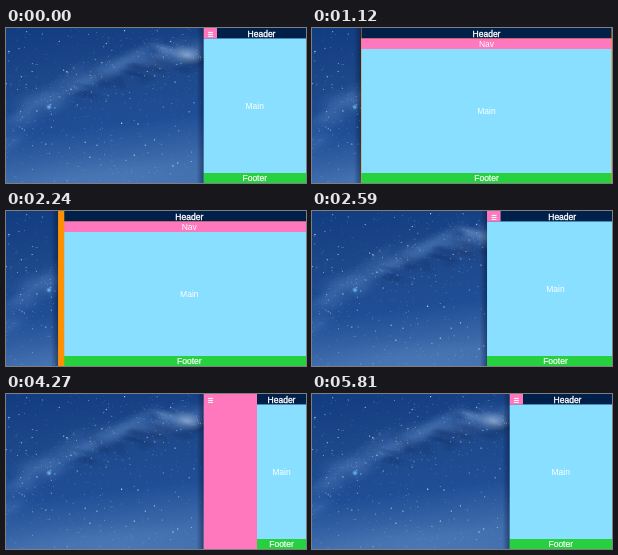
Recreate the animation shown at these times as an HTML page with a canvas. Size 300x155 px, loop 5.88 s.

```html
<!DOCTYPE html>
<html lang="en">
<head>
<meta charset="utf-8">
<title>Responsive grid layout</title>
<style>
html, body { margin: 0; width: 100%; height: 100%; overflow: hidden; background: #1c4788; }
canvas { display: block; width: 300px; height: 155px; }
</style>
</head>
<body>
<canvas id="stage"></canvas>
<script>
const W = 300, H = 155, LOOP = 5880, STEP = 70;
const NARROW = 197.5, WIDE = -6, MAX = 250, BREAK = 165, LAG = 43;
const HEAD = 10.5, FOOT = 145, BUTTON = 13.5, DRAWER = 53.5;
const OPEN = 3990, CLOSE = 5250;
const COLOR = { navy: '#00204a', pink: '#ff78bd', aqua: '#88dfff', green: '#27d03f', orange: '#ff9100' };

const canvas = document.getElementById('stage');
const ctx = canvas.getContext('2d');
const dpr = window.devicePixelRatio || 1;
canvas.width = W * dpr;
canvas.height = H * dpr;

let seed = 41;
function rand() {
  seed = (seed * 16807) % 2147483647;
  return seed / 2147483647;
}
const spread = () => rand() + rand() + rand() - 1.5;

function glow(c, x, y, rx, ry, rgb, alpha, turn = -0.5) {
  c.save();
  c.translate(x, y);
  c.rotate(turn);
  c.scale(rx, ry);
  const g = c.createRadialGradient(0, 0, 0, 0, 0, 1);
  g.addColorStop(0, `rgba(${rgb},${alpha})`);
  g.addColorStop(0.5, `rgba(${rgb},${alpha * 0.5})`);
  g.addColorStop(1, `rgba(${rgb},0)`);
  c.fillStyle = g;
  c.fillRect(-1, -1, 2, 2);
  c.restore();
}

// height of the galaxy band over x
const bandY = x => 112 - 112 * Math.pow(x / 200, 0.62) + 22 * Math.pow(x / 200, 3);

function paintSky() {
  const sky = document.createElement('canvas');
  sky.width = W * dpr;
  sky.height = H * dpr;
  const c = sky.getContext('2d');
  c.scale(dpr, dpr);
  const g = c.createLinearGradient(0, 0, 20, H);
  g.addColorStop(0, '#123c80');
  g.addColorStop(0.35, '#1c4789');
  g.addColorStop(0.7, '#204e96');
  g.addColorStop(1, '#416ead');
  c.fillStyle = g;
  c.fillRect(0, 0, W, H);
  glow(c, 110, 155, 110, 28, '90,135,195', 0.35, 0);

  for (let i = 0; i < 42; i++) {
    const x = i * 4.8;
    glow(c, x, bandY(x) + spread() * 12, 16 + rand() * 12, 7 + rand() * 6, '105,148,208', 0.16);
  }
  for (let i = 0; i < 30; i++) {
    const x = 75 + rand() * 122;
    glow(c, x, bandY(x) + 13 + spread() * 9, 9 + rand() * 8, 3 + rand() * 3, '18,42,92', 0.24, 0.2);
  }
  glow(c, 181, 27, 18, 10, '185,210,238', 0.55, 0.2);
  glow(c, 158, 21, 15, 6, '150,185,225', 0.4, 0.3);

  for (let i = 0; i < 950; i++) {
    const inBand = i % 3 === 0;
    const x = rand() * 200;
    const y = inBand ? bandY(x) + spread() * 34 : rand() * H;
    const size = 0.45 + Math.pow(rand(), 4) * 0.8;
    c.fillStyle = `rgba(205,226,250,${0.15 + Math.pow(rand(), 2) * 0.65})`;
    c.fillRect(x, y, size, size);
  }
  for (let i = 0; i < 38; i++) {
    c.fillStyle = `rgba(225,240,255,${0.55 + rand() * 0.4})`;
    c.beginPath();
    c.arc(rand() * 197, rand() * 140, 0.45 + rand() * 0.3, 0, 7);
    c.fill();
  }
  glow(c, 43, 79, 3, 3, '120,205,255', 0.9, 0);
  return sky;
}

function ease(t, start, end) {
  const u = Math.min(1, Math.max(0, (t - start) / (end - start)));
  return u * u * (3 - 2 * u);
}

// left edge of the dragged window
function edge(t) {
  return NARROW
    + (49 - NARROW) * ease(t, 490, 1120)
    + (WIDE - 49) * ease(t, 1120, 1680)
    + (NARROW - WIDE) * ease(t, 1960, 2754);
}

function box(x, y, right, bottom, color) {
  ctx.fillStyle = color;
  ctx.fillRect(x, y, right - x, bottom - y);
}

function label(text, x, y, weight = 0) {
  ctx.fillStyle = ctx.strokeStyle = '#fff';
  ctx.fillText(text, x, y);
  if (weight) {
    ctx.lineWidth = weight;
    ctx.strokeText(text, x, y);
  }
}

function menuIcon(x) {
  ctx.fillStyle = '#fff';
  for (let i = 0; i < 3; i++) ctx.fillRect(x - 2.4, 3.9 + i * 2, 4.8, 1);
}

function stackLayout(left, width) {
  const a = left + Math.max(0, (width - MAX) / 2);
  const b = a + Math.min(MAX, width);
  const mid = (a + b) / 2;
  box(left, 0, W, H, COLOR.orange);
  box(a, 0, b, HEAD, COLOR.navy);
  box(a, HEAD, b, 21, COLOR.pink);
  box(a, 21, b, FOOT, COLOR.aqua);
  box(a, FOOT, b, H, COLOR.green);
  label('Header', mid, 8.7, 0.35);
  label('Nav', mid, 19.2);
  label('Main', mid, 86.2);
  label('Footer', mid, 153.3, 0.2);
}

function compactLayout(left, width, open) {
  const right = left + width;
  const start = left + (open ? DRAWER : BUTTON);
  const body = open ? start : left;
  const mid = (body + right) / 2;
  box(start, 0, right, HEAD, COLOR.navy);
  box(body, HEAD, right, FOOT, COLOR.aqua);
  box(body, FOOT, right, H, COLOR.green);
  box(left, 0, start, open ? H : HEAD, COLOR.pink);
  menuIcon(left + 7);
  label('Header', (start + right) / 2, 8.7, 0.35);
  label('Main', mid, 81.2);
  label('Footer', mid, 153.3, 0.2);
}

const sky = paintSky();

function draw(t) {
  const left = edge(t);
  // page layout trails the window while it shrinks
  const width = W - Math.min(left, edge(t - LAG));
  ctx.setTransform(1, 0, 0, 1, 0, 0);
  ctx.drawImage(sky, 0, 0);
  ctx.scale(dpr, dpr);

  const shade = ctx.createLinearGradient(left - 7, 0, left, 0);
  shade.addColorStop(0, 'rgba(5,15,45,0)');
  shade.addColorStop(1, 'rgba(5,15,45,0.45)');
  box(left - 7, 0, left, H, shade);

  ctx.save();
  ctx.beginPath();
  ctx.rect(left, 0, W - left, H);
  ctx.clip();
  ctx.font = '8.5px "Liberation Sans", Arial, sans-serif';
  ctx.textAlign = 'center';
  if (width > BREAK) stackLayout(left, width);
  else compactLayout(left, width, t >= OPEN && t < CLOSE);
  ctx.restore();
}

function tick() {
  const t = performance.now() % LOOP;
  draw(Math.floor(t / STEP) * STEP);
  requestAnimationFrame(tick);
}
tick();
</script>
</body>
</html>
```
